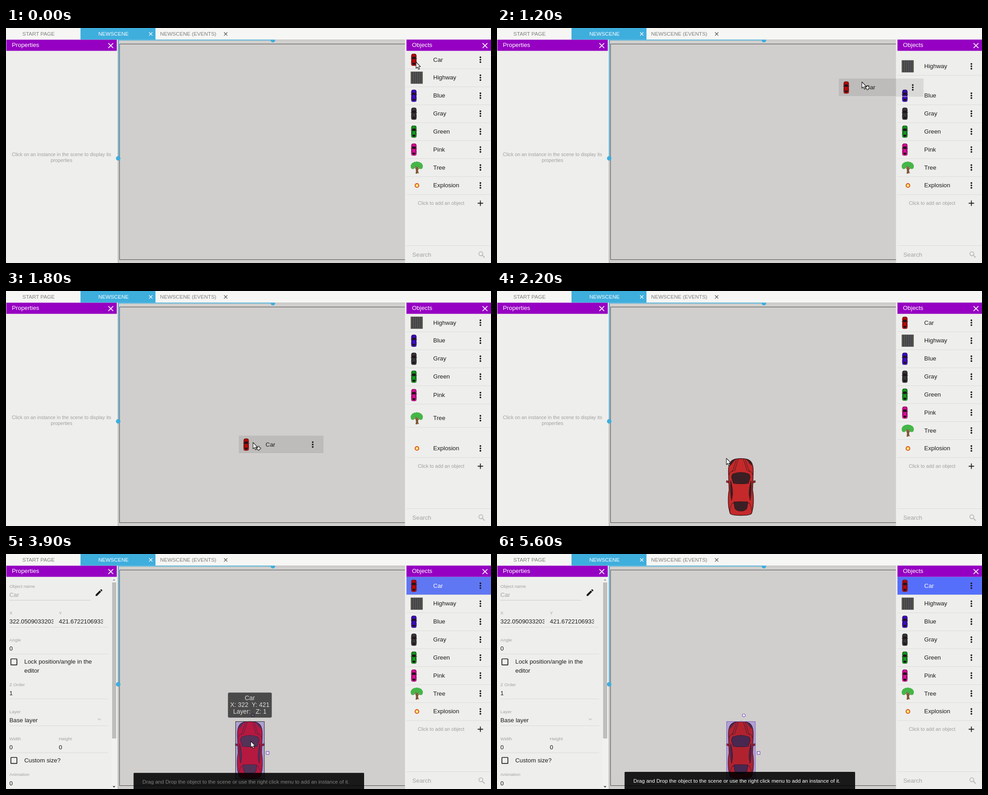
An HTML page that plays this animation: 1074 by 521 pixels, repeating every 6.2 s.

```html
<!DOCTYPE html>
<html lang="en">
<head>
<meta charset="utf-8">
<title>Scene editor</title>
<style>
  html, body { margin: 0; width: 100%; height: 100%; overflow: hidden; background: #eeeeec; }
  svg { display: block; }
  text { font: 13.28px "Liberation Sans", Arial, sans-serif; fill: #1c1c1c; white-space: pre; }
  .tab { font-size: 11.62px; fill: #7c7c7a; }
  .hint { font-size: 10.79px; fill: #a0a09e; }
  .label { font-size: 9.96px; fill: #a2a2a0; }
  .tip { font-size: 13.9px; fill: #dcdcda; text-anchor: middle; }
  .snack { font-size: 11.61px; }
  .mid { text-anchor: middle; }
  .white { fill: #fff; }
  .faint { fill: #a3a3a1; }
  .rule { stroke: #dbdbd9; fill: none; }
  #car { --body: #c5292a; --glass: #3a2025; --ink: #33161a; }
  #car.hover { --body: #ca2924; --glass: #45282d; }
  #car.selected { --body: #b0232e; --glass: #482850; --ink: #36163c; }
  #car.hover.selected { --body: #b5193f; --glass: #543358; --ink: #45204e; }
</style>
</head>
<body>
<svg id="stage" width="1074" height="521" viewBox="0 0 1074 521"></svg>
<script>
const LOOP = 6200, STEP = 100, ROW = 39.82, LIST_X = 886.8, LIST_Y = 50.6;
const BLUE = '#3eaedd', INK = '#1c1c1c';

const rect = (x, y, w, h, fill, more = '') =>
  `<rect x="${x}" y="${y}" width="${w}" height="${h}" fill="${fill}" ${more}/>`;
const dot = (x, y, r, fill, more = '') => `<circle cx="${x}" cy="${y}" r="${r}" fill="${fill}" ${more}/>`;
const path = (d, fill, more = '') => `<path d="${d}" fill="${fill}" ${more}/>`;
const line = (d, color, width = 1, more = '') =>
  path(d, 'none', `stroke="${color}" stroke-width="${width}" ${more}`);
const text = (x, y, s, cls = '') => `<text x="${x}" y="${y}" class="${cls}">${s}</text>`;
const rule = (x, y, w) => `<path class="rule" d="M${x} ${y}h${w}"/>`;
const group = (id, body, more = '') => `<g id="${id}" ${more}>${body}</g>`;
const cross = (x, y, r, color, w) =>
  line(`M${x - r} ${y - r}l${2 * r} ${2 * r}m0 ${-2 * r}l${-2 * r} ${2 * r}`, color, w);
const range = n => [...Array(n).keys()];

// Car from above, 64 by 127, centred on x = 0
function car() {
  const ink = 'stroke="var(--ink)" stroke-width="1.1"', glass = 'var(--glass)';
  const side = path('M-27 54l-5-1.5 .4-3.5 5 1.5z', 'var(--body)', ink) +
    path('M-22.5 49q4.5 17 4.2 31l-2.2 13q-3.6-22-2-44z', glass, ink) +
    path('M-23.5 11q3-8 13-9.4-6 4-8 9l-6 6z', glass) +
    line('M-6 2l-8 26M-10 3l-9 27M-26 36q1-8 10-9M-25 118q2-14 7-20M-19.5 99h4.5', 'var(--ink)', .9);
  return path('M0 0C-14 0-22 3-25.5 13C-29 22-27 34-27 43L-26 70C-29 84-28 98-27 108L-24 121Q-22 126 0 126' +
      'Q22 126 24 121L27 108C28 98 29 84 26 70L27 43C27 34 29 22 25.5 13C22 3 14 0 0 0Z',
      'var(--body)', 'stroke="var(--ink)" stroke-width="1.4"') +
    side + `<g transform="scale(-1 1)">${side}</g>` +
    path('M-20.5 42q0-5 3-8Q0 27 17.5 34q3 3 3 8l-4 13Q0 57-16.5 55z', glass, ink) +
    path('M-15.5 96Q0 95 15.5 96l-2 14Q10 116 0 116.5Q-10 116-13.5 110z', glass, ink);
}

// Object list icons, in row coordinates
const miniCar = color =>
  `<g transform="translate(16.4 6.4) scale(.213)" style="--body:${color};--glass:#20141a;--ink:#26181c">${car()}</g>`;
const highway = () => rect(9.4, 6.3, 26.6, 26.8, '#444446') +
  range(6).map(i => line(`M${11.2 + 4.6 * i} 6.3v26.8`, i % 5 ? '#69696c' : '#6f6d48')).join('');
const tree = () =>
  path('M20 33q2-6 0-11l-4-3 1-1 5 3 1-4h1.500l.5 5 5-3 1 1-5 4q-1 5 2 9l-3-1-2 1.500z', '#7d5634') +
  range(9).map(i => {
    const a = Math.PI * (i / 8 * 1.2 - .1);
    return dot(22.8 - 9.2 * Math.cos(a), 17 - 6 * Math.sin(a), 4.5, '#45b648');
  }).join('') +
  dot(23, 15, 5, '#45b648') + line('M23 31V20l-4-3M23 22l4-4', '#7d5634', 1.8);
const blast = () => dot(23.2, 19.8, 4.2, '#f8d23c', 'stroke="#d8441c" stroke-width="1.7"') +
  dot(23.2, 19.8, 2, '#fff6a8');

const objects = [
  ['Car', miniCar('#b80808')], ['Highway', highway()], ['Blue', miniCar('#3c0ac4')],
  ['Gray', miniCar('#353537')], ['Green', miniCar('#119a1c')], ['Pink', miniCar('#dc0a96')],
  ['Tree', tree()], ['Explosion', blast()]
];
const rowBody = ([name, icon]) => icon + text(59.3, 24, name) +
  range(3).map(i => dot(163.7, 14.4 + 5.3 * i, 1.9, INK)).join('') + rule(0, 39.9, 188);

function properties() {
  const field = (y, name, value, x = 7.5, cls = '') => text(x, y, name, 'label') +
    `<svg x="${x}" y="${y}" width="97.5" height="26">${text(0, 20.4, value, cls)}</svg>`;
  const under = y => rule(7.5, y + 28.2, 218.5);
  const check = y => rect(10.8, y, 13.4, 13.4, 'none', `rx="1" stroke="${INK}" stroke-width="1.7"`);
  const pair = (y, a, b, v, w) => field(y, a, v) + field(y, b, w, 117) + under(y);
  const single = (y, name, value) => field(y, name, value) + under(y);
  return rect(0, 50, 246, 471, '#eeeeec') +
    field(74.5, 'Object name', 'Car', 7.5, 'faint') +
    line('M7.5 102.5H187', '#a5a5a3', 1, 'stroke-dasharray="1.2 1.2"') +
    path('M3 17.25V21h3.75L17.81 9.94l-3.75-3.75zM20.7 7q.7-.7 0-1.4l-2.3-2.3q-.7-.7-1.4 0l-1.8 1.8 3.7 3.7z',
      INK, 'transform="translate(196 75.6) scale(.83)"') +
    pair(134, 'X', 'Y', '322.0509033203', '421.6722106933') +
    single(193.5, 'Angle', '0') +
    check(232.5) + text(40.5, 243.4, 'Lock position/angle in the') + text(40.5, 263.2, 'editor') +
    single(293, 'Z Order', '1') +
    single(352.6, 'Layer', 'Base layer') + path('M202 365h9l-4.5 4.5z', '#d0d0ce') +
    pair(412.5, 'Width', 'Height', '0', '0') +
    check(451) + text(40.5, 462, 'Custom size?') +
    single(492.3, 'Animation', '0') +
    rect(234, 51, 11, 470, '#f1f1ef') + rect(235, 63, 9, 346, '#bebebc') +
    path('M236 59l3.2-3.5 3.2 3.5z', '#a0a09e') + path('M236 514.5h6.4l-3.2 3.5z', '#444');
}

const panelHead = (x, w, title, tx, cx) => rect(x, 25.7, w, 24.9, '#9600c2') +
  text(tx, 41.8, title, 'white') + cross(cx, 39, 5.4, '#fff', 1.6);
const carFrame = fill => rect(508.5, 371.5, 63.5, 127, fill);
const handle = 'stroke="#7548c0" stroke-width="1.2"';

document.getElementById('stage').innerHTML =
  rect(248, 25, 640, 496, '#d0cfcd') +
  rect(251.5, 35.5, 700, 478, 'none', 'stroke="#4a4a4a"') +
  group('shade', carFrame('#afa2d2')) +
  group('car', car(), 'transform="translate(540 371.5)"') +
  group('frame', carFrame('none')) +
  group('handles', dot(546.5, 357.7, 3.2, '#fff', handle) + rect(576.2, 438, 6.2, 6.2, '#fff', handle)) +
  group('tip', rect(491.5, 307.3, 97, 55.5, '#000', 'rx="3" fill-opacity=".64"') +
    ['Car', 'X: 322  Y: 421', 'Layer:   Z: 1'].map((s, i) => text(540, 323.7 + 15 * i, s, 'tip')).join('')) +
  line('M248 26.2H884', '#b4b4b2') +
  rect(0, 25, 248, 496, '#eeeeec') +
  text(123, 284.3, 'Click on an instance in the scene to display its', 'hint mid') +
  text(123, 296.8, 'properties', 'hint mid') +
  group('props', properties()) + panelHead(.8, 244.5, 'Properties', 13, 232) +
  line('M248.5 26V521', '#b6b6b4', 2) + line('M249 289V26.5H591', BLUE, 1.8) +
  dot(591, 27, 5, BLUE) + dot(248.5, 289, 5, BLUE) +
  rect(0, 0, 1074, 25.7, '#f6f6f4') + rect(165, 0, 166, 25.7, BLUE) +
  text(72, 17, 'START PAGE', 'tab mid') + text(238, 17, 'NEWSCENE', 'tab mid white') +
  text(403.5, 17, 'NEWSCENE (EVENTS)', 'tab mid') +
  cross(320.5, 13.2, 3.7, '#fff', 1.3) + cross(486.5, 13.2, 3.7, '#555', 1.3) +
  rect(883.5, 25.7, 190.5, 496, '#eeeeec') +
  group('pick', rect(LIST_X, LIST_Y, 188, 40, 'currentColor')) +
  objects.map((o, i) => group('row' + i, rowBody(o))).join('') +
  panelHead(LIST_X, 188, 'Objects', 899, 1060.7) +
  text(912, 392, 'Click to add an object', 'hint') + line('M1044.5 388.5h12m-6-6v12', INK, 1.8) +
  rule(LIST_X, 482.5, 188) + text(899.7, 506.7, 'Search', 'faint') +
  dot(1051.5, 500.5, 4.3, 'none', 'stroke="#b8b8b6" stroke-width="1.7"') +
  line('M1054.5 503.5l5.5 5.5', '#b8b8b6', 2) +
  group('snack', rect(282.5, 483, 510.5, 48, '#000', 'rx="1.6" fill-opacity=".88"') +
    text(302, 507, 'Drag and Drop the object to the scene or use the right click menu to add an instance of it.', 'snack white')) +
  group('drag', rect(0, 0, 187.5, 40, '#000', 'fill-opacity=".09"') + rowBody(objects[0])) +
  group('cursor',
    path('M0 0V14l3.2-2.8 2.3 5 2.3-1-2.2-4.9H10z', '#fff', 'stroke="#111" stroke-width="1.1" stroke-linejoin="round"') +
    group('plus', path('M11 8.5h3v3h3v3h-3v3h-3v-3h-3v-3h3z', '#fff', 'stroke="#111"')));

const $ = id => document.getElementById(id);
const show = (id, on) => { $(id).style.display = on ? '' : 'none'; };
const move = (id, x, y) => $(id).setAttribute('transform', `translate(${x} ${y})`);

function bezier(x1, y1, x2, y2) {
  const at = (a, b, u) => 3 * a * u * (1 - u) ** 2 + 3 * b * u * u * (1 - u) + u ** 3;
  return p => {
    if (p <= 0 || p >= 1) return p <= 0 ? 0 : 1;
    let lo = 0, hi = 1;
    for (let i = 0; i < 24; i++) {
      const m = (lo + hi) / 2;
      if (at(x1, x2, m) < p) lo = m; else hi = m;
    }
    return at(y1, y2, lo);
  };
}
const ease = bezier(.25, .1, .25, 1), glide = bezier(.23, 1, .32, 1);
const linear = p => p, speedUp = p => p * p, slowDown = p => 1 - (1 - p) ** 1.6;

// Position on a path of [time, x, y, easing towards this point]
function along(keys, t) {
  const i = keys.findIndex(k => t <= k[0]);
  if (i < 1) return keys[i ? keys.length - 1 : 0].slice(1, 3);
  const [a, x, y] = keys[i - 1], [b, x2, y2, curve = linear] = keys[i];
  const p = curve((t - a) / (b - a));
  return [x + (x2 - x) * p, y + (y2 - y) * p];
}
const dragPath = [[600, LIST_X, LIST_Y], [1200, 757, 112, speedUp],
  [1500, 620.5, 229.5, slowDown], [2000, 484, 348, slowDown]];
const cursorPath = [[0, 908, 75.5], [200, 917, 74], [600, 917, 74], [1200, 808, 119.5, speedUp],
  [1500, 677, 218.5], [2000, 508, 371, slowDown], [2600, 508, 371], [3100, 542, 415, slowDown],
  [4500, 542, 415], [4600, 482, 487], [5200, 30, 1], [5400, 36, 6]];

function draw(t) {
  const dragging = t >= 700 && t < 2100, hover = t >= 2700 && t < 4600, selected = t >= 3700;

  // Rows close the gap one after another
  objects.forEach((o, i) => {
    const up = dragging && i ? ease((t - 972 - 118 * i) / 300) : 0;
    move('row' + i, LIST_X, LIST_Y + ROW * (i - up));
  });
  show('row0', !dragging);
  show('drag', dragging);
  move('drag', ...along(dragPath, t));

  show('car', t >= 2100);
  $('car').setAttribute('class', (hover ? 'hover ' : '') + (selected ? 'selected' : ''));
  show('shade', selected);
  show('handles', selected);
  show('frame', hover || selected);
  $('frame').style.stroke = hover ? '#252525' : '#8558bd';
  show('tip', hover);

  show('props', selected);
  show('pick', selected);
  $('pick').style.color = t < 4300 ? '#5f77f3' : '#566ffb';
  $('row0').querySelector('text').style.fill = selected ? '#fff' : '';

  show('snack', selected);
  move('snack', 0, 48 * (1 - glide((t - 3690) / 450)));
  $('snack').lastElementChild.style.opacity = ease((t - 3780) / 450);

  show('cursor', t < 4700 || (t >= 5200 && t < 5600));
  show('plus', t >= 200 && t < 2200);
  move('cursor', ...along(cursorPath, t));
}

const start = performance.now();
function tick() {
  const t = (performance.now() - start) % LOOP;
  draw(Math.floor(t / STEP) * STEP);
  requestAnimationFrame(tick);
}
tick();
</script>
</body>
</html>
```
